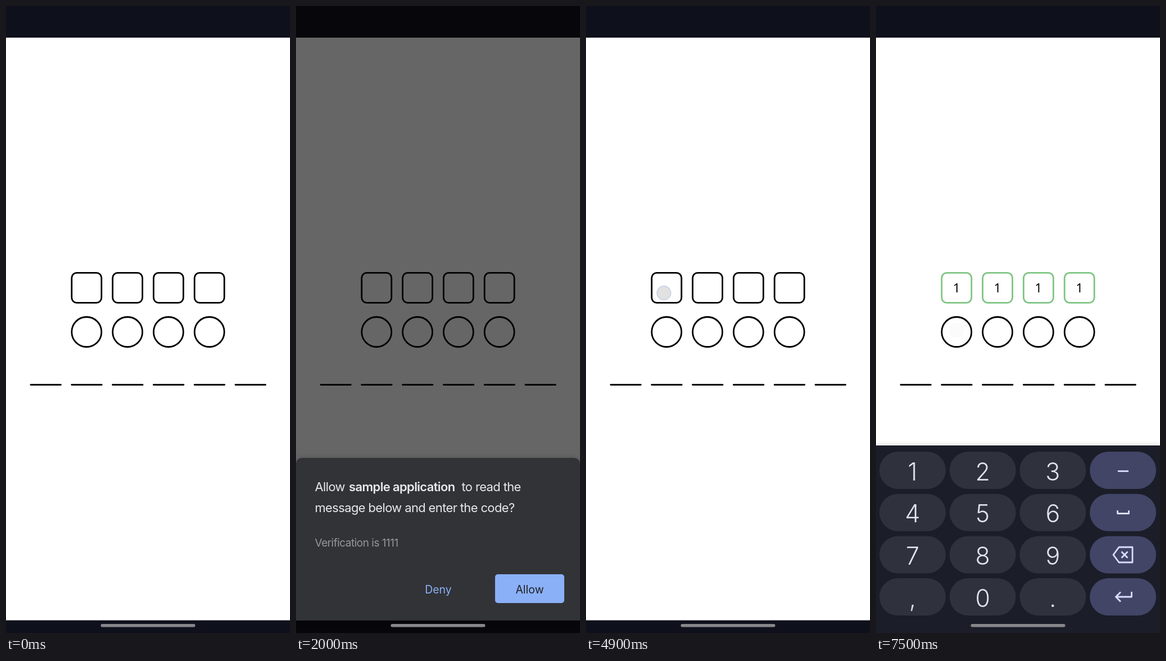
An HTML page for the animation above (8 s loop, 505x1110 px).

```html
<!DOCTYPE html>
<html lang="en">
<head>
<meta charset="utf-8">
<title>Code entry</title>
<style>
html, body { margin: 0; width: 100%; height: 100%; overflow: hidden; background: #fff; }
svg { display: block; width: 100%; height: 100%; }
text { font-family: Inter, Roboto, sans-serif; }
.cells { fill: none; stroke: #000; stroke-width: 2.8; }
.cells text { font: 22px "Noto Sans", sans-serif; fill: #000; stroke: none; text-anchor: middle; }
.title { font-size: 22px; letter-spacing: -.65px; fill: #e9e9eb; }
.title .bold { font-weight: 600; }
.note { font-size: 19px; letter-spacing: -.5px; fill: #96979a; }
.button { font-size: 19.5px; text-anchor: middle; }
#keys text { font-size: 43px; font-weight: 300; fill: #e1e2f0; text-anchor: middle; }
.icons { fill: none; stroke: #dcdcff; stroke-width: 2.8; stroke-linejoin: round; }
#sheet, #keyboard { filter: drop-shadow(0 0 5px #0003); }
</style>
</head>
<body>
<svg viewBox="0 0 505 1110" preserveAspectRatio="none">
  <rect width="505" height="1110" fill="#0e101b"/>
  <rect y="56" width="505" height="1031.5" fill="#fff"/>
  <g id="squares" class="cells"></g>
  <g id="circles" class="cells"></g>
  <g id="lines" class="cells" stroke-linecap="round"></g>

  <g id="keyboard">
    <rect y="778" width="505" height="340" fill="#1b1d28"/>
    <g id="keys"></g>
    <g class="icons">
      <path d="M430 823.5H449"/>
      <path d="M429.5 893V898.5H449.5V893"/>
      <path d="M432 958H456V985H432L422 971.5ZM436.5 966L447.5 977M447.5 966L436.5 977"/>
      <path d="M454.5 1037V1046H427M435 1037.5L426.500 1046L435 1054.500"/>
    </g>
  </g>

  <rect id="dim" width="505" height="1110"/>
  <g id="sheet">
    <path d="M0 1087.500V812Q0 800 12 800H493Q505 800 505 812V1087.500Z" fill="#323337"/>
    <g class="title">
      <text x="33.500" y="858.500">Allow</text>
      <text x="94" y="858.500" class="bold">sample application</text>
      <text x="294.500" y="858.500">to read the</text>
      <text x="33.500" y="896">message below and enter the code?</text>
    </g>
    <text x="33.500" y="957" class="note">Verification is 1111</text>
    <rect x="354" y="1006" width="123" height="51" rx="5" fill="#8ab0f7"/>
    <text x="253" y="1039.500" class="button" fill="#8ab0f7">Deny</text>
    <text x="415.500" y="1039.500" class="button" fill="#202124">Allow</text>
  </g>

  <g id="touch">
    <circle id="trail" cy="4" r="12.500" fill="#7f879c" opacity=".8"/>
    <circle r="12.200" fill="#c6c6c6" stroke="#7b97cf" stroke-opacity=".7" stroke-width="2"/>
  </g>
  <rect x="168.500" y="1094" width="168" height="5.500" rx="2.750" fill="#87868b"/>
</svg>
<script>
const LOOP = 8000, STEP = 100, PITCH = 72.8;
const $ = id => document.getElementById(id);
const clamp = v => Math.max(0, Math.min(1, v));
const build = (id, n, make) => {
  $(id).innerHTML = Array.from({ length: n }, (_, i) => make(i)).join('');
};

build('squares', 4, i => {
  const x = 143.3 + i * PITCH;
  return `<rect x="${x - 26.5}" y="472.300" width="53" height="53" rx="9"/>
    <text x="${x}" y="506.500">1</text>`;
});
build('circles', 4, i => `<circle cx="${143.3 + i * PITCH}" cy="577" r="26.500"/>`);
build('lines', 6, i => `<path d="M${44 + i * PITCH} 670.500h53.400"/>`);
build('keys', 16, i => {
  const col = i % 4, row = Math.floor(i / 4);
  const x = 6 + col * 124.7, y = 789 + row * 74.7;
  return `<rect x="${x}" y="${y}" width="118" height="66" rx="33" fill="${col < 3 ? '#2f313d' : '#424566'}"/>
    <text x="${x + 59}" y="${y + 50.5}">${'123 456 789 ,0. '[i]}</text>`;
});
const digits = document.querySelectorAll('#squares text');
const firstKey = document.querySelector('#keys rect');

// Each touch: start time, x, y, opacity per step
const touches = [
  [3200, 413, 1030, [.9, .5]],
  [4900, 138.5, 508, [.5, .8, .4]],
  ...[0, 1, 2, 3].map(i => [5500 + i * 200, 91, 803, [.5, .92]]),
  [7300, 143, 574.5, [.5, .25, .05, .05, .05, .05, .05]]
];

function dialog(t) {
  if (t < 1400 || t >= 3400) return { dim: 0, alpha: 0, drop: 0 };
  if (t < 3200) {
    const p = clamp((t - 1310) / 400);
    return { dim: .6 * p, alpha: clamp(2.58 * p), drop: 190 * (1 - p) ** 3 };
  }
  const p = (t - 3200) / 204;
  return { dim: .6 * (1 - p), alpha: (1 - p) ** 2, drop: 175 * p };
}

function draw(t) {
  const { dim, alpha, drop } = dialog(t);
  $('dim').setAttribute('opacity', dim);
  $('sheet').setAttribute('opacity', alpha);
  $('sheet').setAttribute('transform', `translate(0 ${drop})`);

  const failed = t >= 3300 && t < 3600;
  const shake = failed ? 7.4 * Math.cos(Math.PI * (t - 3300) / 100) * (3600 - t) / 300 : 0;
  $('circles').setAttribute('transform', `translate(${shake} 0)`);
  $('circles').style.stroke = failed ? '#e56262' : '#000';

  const rise = clamp((t - 5000) / 300);
  $('keyboard').setAttribute('transform', `translate(0 ${345 * (1 - rise) ** 3})`);
  digits.forEach((d, i) => d.setAttribute('opacity', t >= 5600 + i * 200 ? 1 : 0));
  $('squares').style.stroke = t >= 6300 ? '#7dc582' : '#000';

  const typing = t >= 5500 && t < 6300;
  firstKey.setAttribute('fill', typing ? '#42444f' : '#2f313d');
  $('trail').setAttribute('visibility', typing ? 'visible' : 'hidden');

  const touch = touches.find(([start, , , fade]) => t >= start && t < start + fade.length * STEP);
  $('touch').setAttribute('opacity', touch ? touch[3][(t - touch[0]) / STEP] : 0);
  if (touch) $('touch').setAttribute('transform', `translate(${touch[1]} ${touch[2]})`);
}

const begin = performance.now();
function tick() {
  const t = (performance.now() - begin) % LOOP;
  draw(Math.floor(t / STEP) * STEP);
  requestAnimationFrame(tick);
}
tick();
</script>
</body>
</html>
```
